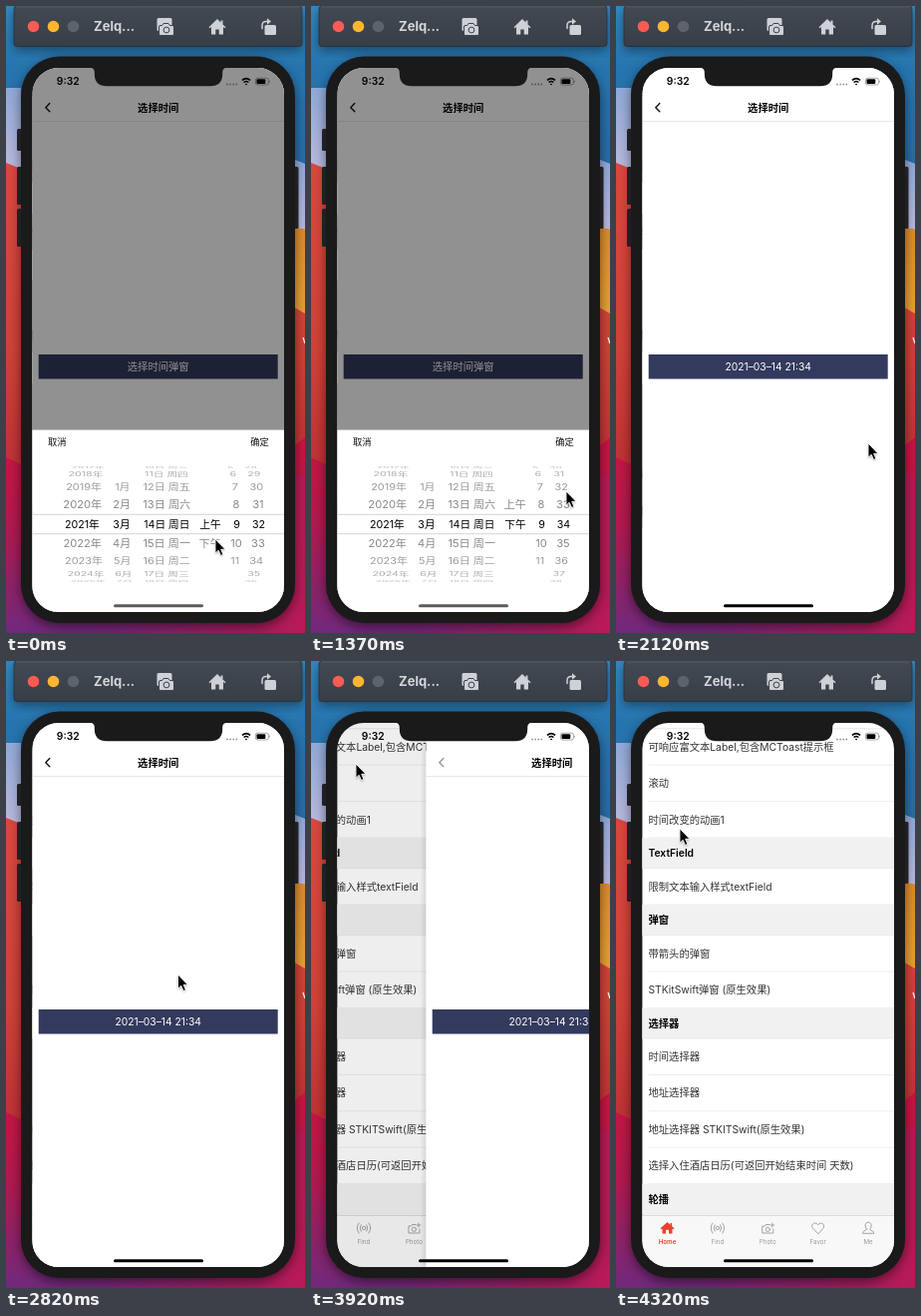
These frames come from a looping animation (300x628 px, 4340 ms). An HTML page:

```html
<!DOCTYPE html>
<html lang="zh-CN">
<head>
<meta charset="utf-8">
<title>选择时间</title>
<style>
html, body { margin: 0; width: 100%; height: 100%; overflow: hidden; background: #1d1d1f; }
svg { display: block; width: 100%; height: 100%; }
text { font-family: Inter, "Noto Sans CJK SC", "Noto Sans CJK", sans-serif; white-space: pre; }
.line { fill: none; stroke-linecap: round; stroke-linejoin: round; }
</style>
</head>
<body>
<svg id="stage" viewBox="0 0 300 628" xmlns="http://www.w3.org/2000/svg">
  <defs>
    <linearGradient id="wallSky" x1="0" y1="0" x2="0" y2="1">
      <stop offset="0" stop-color="#3489c2"/><stop offset=".1" stop-color="#2674ae"/>
      <stop offset=".26" stop-color="#2a6ca6"/>
    </linearGradient>
    <linearGradient id="wallPale" x1="0" y1="0" x2="0" y2="1">
      <stop offset="0" stop-color="#8fa9d8"/><stop offset="1" stop-color="#b9b9dc"/>
    </linearGradient>
    <linearGradient id="wallRed" x1="0" y1="0" x2="0" y2="1">
      <stop offset="0" stop-color="#d9483d"/><stop offset=".6" stop-color="#cf4237"/>
      <stop offset="1" stop-color="#bd3136"/>
    </linearGradient>
    <linearGradient id="wallLow" x1="0" y1="0" x2="0" y2="1">
      <stop offset="0" stop-color="#cb1440"/><stop offset=".45" stop-color="#b01a4e"/>
      <stop offset="1" stop-color="#70297c"/>
    </linearGradient>
    <linearGradient id="wallPink">
      <stop offset=".3" stop-color="#b81a56" stop-opacity="0"/><stop offset="1" stop-color="#b81a56"/>
    </linearGradient>
    <linearGradient id="wallGold" x1="0" y1="0" x2="0" y2="1">
      <stop offset="0" stop-color="#dc8a2c"/><stop offset="1" stop-color="#e7a234"/>
    </linearGradient>
    <linearGradient id="bar" x1="0" y1="0" x2="0" y2="1">
      <stop offset="0" stop-color="#434953"/><stop offset="1" stop-color="#383e48"/>
    </linearGradient>
    <linearGradient id="edge">
      <stop offset="0" stop-color="#000" stop-opacity="0"/><stop offset="1" stop-color="#000" stop-opacity=".1"/>
    </linearGradient>
    <filter id="blur" x="-20%" y="-20%" width="140%" height="140%"><feGaussianBlur stdDeviation="6"/></filter>
    <filter id="soft" x="-50%" y="-50%" width="200%" height="200%"><feGaussianBlur stdDeviation="1"/></filter>
    <clipPath id="screen"><rect x="26.400" y="62" width="252.600" height="545" rx="26.500"/></clipPath>
    <clipPath id="drum"><rect x="26" y="460.500" width="253" height="116.500"/></clipPath>
  </defs>

  <rect width="300" height="628" fill="url(#wallSky)"/>
  <path d="M0 82H15V165H0z" fill="url(#wallPale)"/>
  <path d="M285 152L300 158V226H285z" fill="url(#wallPale)"/>
  <path d="M0 157L15 163L286 221L300 224V470H0z" fill="url(#wallRed)"/>
  <path d="M286 221L300 224V308L286 300z" fill="url(#wallGold)"/>
  <path d="M0 452L15 459L290 440L300 432V628H0z" fill="url(#wallLow)"/>
  <path d="M0 470H300V628H0z" fill="url(#wallPink)"/>
  <path d="M298 332L300 338" stroke="#fff" stroke-width="1.200"/>
  <rect x="15" y="54" width="275" height="568" rx="40" filter="url(#blur)" opacity=".5"/>
  <rect x="8" y="4" width="289" height="40" rx="3" filter="url(#blur)" opacity=".45"/>

  <rect x="8" y="0" width="289" height="40.500" rx="3" fill="url(#bar)" stroke="#23272e" stroke-width=".6"/>
  <path d="M10 .8H295" stroke="#646a73" stroke-width=".7"/>
  <circle cx="27.500" cy="20.500" r="5.800" fill="#fc5b53"/>
  <circle cx="47.500" cy="20.500" r="5.800" fill="#fcb62f"/>
  <circle cx="67.500" cy="20.500" r="5.800" fill="#5d626c"/>
  <text x="88" y="25.300" font-size="13" font-weight="700" fill="#d5d7da">Zelq...</text>
  <g fill="#ced1d5" stroke="#3d434d">
    <rect x="151.500" y="12" width="15" height="13" rx="1.500" stroke="none"/>
    <path d="M154 19.500h2.700l1.300-2h5l1.300 2h2.700q1.500 0 1.500 1.500v7q0 1.500-1.500 1.500h-12q-1.500 0-1.500-1.500v-7q0-1.500 1.500-1.500z"/>
    <circle cx="161" cy="24" r="2.900"/>
    <path d="M212 13L203.500 21.300L204.500 22.300L206 21V28.500H210.300V23.500H213.700V28.500H218V21L219.500 22.300L220.500 21.300L217.500 18.400V14.500H215.500V16.400z" stroke="none"/>
    <rect x="259.500" y="19" width="11.500" height="10" rx="1.500" stroke="none"/>
    <path class="line" d="M257 22.500V19.500Q257 15.500 261 15.500H263" stroke="#ced1d5" stroke-width="1.500"/>
    <path d="M262 12.300L266 15.500L262 18.700z" stroke="none"/>
  </g>

  <g fill="#202024">
    <rect x="11" y="123" width="6" height="22" rx="1.500"/>
    <rect x="11" y="161" width="6" height="38" rx="1.500"/>
    <rect x="11" y="203" width="6" height="38" rx="1.500"/>
    <rect x="287" y="161" width="6.500" height="62" rx="1.500"/>
  </g>
  <rect x="15" y="50.500" width="275" height="567.500" rx="38.500" fill="#1a1a1b"/>

  <g clip-path="url(#screen)">
    <rect x="26" y="62" width="253" height="545" fill="#fff"/>
    <g id="list"></g>
    <rect id="listDim" x="26" y="62" width="253" height="545"/>
    <g id="page">
      <rect x="20.500" y="62" width="6" height="545" fill="url(#edge)"/>
      <rect x="26.400" y="62" width="253" height="545" fill="#fff"/>
      <path d="M26.400 115.500H279" stroke="#dedede" stroke-width=".7"/>
      <path id="back" class="line" d="M43.800 97.600L39.800 101.700L43.800 105.800" stroke="#111" stroke-width="1.400"/>
      <text x="152.700" y="105.700" font-size="10.300" font-weight="600" text-anchor="middle">选择时间</text>
      <rect x="32.700" y="349" width="240" height="24.500" fill="#333a5e"/>
      <text id="label" x="152.700" y="365" font-size="10.300" fill="#fff" text-anchor="middle"></text>
    </g>
    <rect id="dim" x="26" y="62" width="253" height="545"/>
    <g id="sheet">
      <rect x="26" y="424.600" width="253" height="183" fill="#fff"/>
      <text x="42" y="440.300" font-size="9.300" fill="#111">取消</text>
      <text x="245.300" y="440.300" font-size="9.300" fill="#111">确定</text>
      <path d="M26 509.300H279M26 528.700H279" stroke="#cbcbcb" stroke-width=".8"/>
      <g id="wheels" clip-path="url(#drum)"></g>
    </g>
    <text x="50.800" y="79.400" font-size="10.300" font-weight="600">9:32</text>
    <g id="dots" opacity=".42"></g>
    <g class="line" stroke="#000" stroke-width="1.500">
      <path d="M236.900 74.400Q241 70.900 245.100 74.400M238.600 76.500Q241 74.600 243.400 76.500" stroke-linecap="butt"/>
      <circle cx="241" cy="78.400" r=".5" stroke-width=".8" fill="#000"/>
    </g>
    <g opacity=".5">
      <rect x="250.400" y="72.200" width="13" height="6.800" rx="2" fill="none" stroke="#000" stroke-width=".7"/>
      <path d="M264.400 74.300Q266 75.600 264.400 76.900z"/>
    </g>
    <rect x="251.500" y="73.300" width="8.800" height="4.600" rx="1"/>
    <rect id="homeBar" x="108" y="599.200" width="90" height="3" rx="1.500"/>
  </g>
  <path d="M84 60V61.800Q88.800 62 88.800 66.500V68Q88.800 80.300 101 80.300H205Q217.200 80.300 217.200 68V66.500Q217.200 62 222 61.800V60z" fill="#1a1a1b"/>
  <g id="cursor">
    <path d="M0 1.500V15.500L3.200 12.600L5.500 17.600L7.900 16.500L5.700 11.600H10z" filter="url(#soft)" opacity=".35"/>
    <path d="M0 0V14.200L3.200 11.300L5.500 16.500L7.900 15.400L5.700 10.300H10z" stroke="#fff" stroke-width=".9"/>
  </g>
</svg>
<script>
const LOOP = 4340, WIDTH = 252, SHEET = 183;
const $ = id => document.getElementById(id);
const clamp = v => Math.min(1, Math.max(0, v));
const span = (t, a, b) => clamp((t - a) / (b - a));
const smooth = u => u * u * (3 - 2 * u);
const move = (id, x, y) => $(id).setAttribute('transform', `translate(${x.toFixed(2)} ${y.toFixed(2)})`);
const fade = (id, v) => $(id).setAttribute('opacity', v.toFixed(3));

// Underlying list: a leading # marks a section header
const ROWS = ['可响应富文本Label,包含MCToast提示框', '滚动', '时间改变的动画1', '#TextField',
  '限制文本输入样式textField', '#弹窗', '带箭头的弹窗', 'STKitSwift弹窗 (原生效果)', '#选择器',
  '时间选择器', '地址选择器', '地址选择器 STKITSwift(原生效果)', '选择入住酒店日历(可返回开始结束时间 天数)', '#轮播'];
const TABS = [
  ['Home', '<path d="M0-6L-7 .3L-6 1.200L-5 .5V5.500H-1.500V1.800H1.500V5.500H5V.5L6 1.200L7 .3L4.500-2V-5H3V-3.300z" fill="#e8412c" stroke="none"/>'],
  ['Find', '<circle r="1.700"/><path d="M-2.800-3.200Q-5 0-2.800 3.200M2.800-3.200Q5 0 2.800 3.200M-5-5Q-8.500 0-5 5M5-5Q8.500 0 5 5"/>'],
  ['Photo', '<path d="M1.500-3.500H-2L-3-2H-5.500V5H5.500V1"/><circle cy="1.300" r="2.100"/><path d="M4.500-5V-1M2.500-3H6.500"/>'],
  ['Favor', '<path d="M0 5.500L-5.200.2C-8-3-3.500-7.300 0-3.300C3.500-7.300 8-3 5.200.2z"/>'],
  ['Me', '<path d="M-1.500 1C-4-1-3.500-5.800 0-5.800S4-1 1.500 1Q1.600 2 4.500 3Q5.500 3.500 5.500 5.300H-5.500Q-5.500 3.500-4.500 3Q-1.600 2-1.500 1z"/>'],
];

function buildList() {
  let y = 67.8, out = '<path d="M26 67.800H279" stroke="#dcdcdc" stroke-width=".7"/>';
  for (const row of ROWS) {
    const head = row[0] === '#', h = head ? 30.6 : 36.4;
    if (head) out += `<rect x="26" y="${y}" width="253" height="${h}" fill="#f1f1f2"/>`;
    out += `<text x="32.500" y="${y + h / 2 + 3.8}" font-size="10.300" fill="${head ? '#000' : '#333'}" font-weight="${head ? 600 : 400}">${head ? row.slice(1) : row}</text>`;
    y += h;
    out += `<path d="M${head ? 26 : 33} ${y}H279" stroke="#e2e2e2" stroke-width=".6"/>`;
  }
  out += '<rect x="26" y="555.500" width="253" height="52" fill="#f8f8f8"/><path d="M26 555.500H279" stroke="#cfcfcf" stroke-width=".7"/>';
  TABS.forEach(([name, icon], i) => {
    const x = 51.5 + 50.4 * i;
    out += `<g class="line" stroke="#9a9a9a" stroke-width=".9" transform="translate(${x} 568)">${icon}</g>`
      + `<text x="${x}" y="584.300" font-size="6.200" font-weight="${i ? 400 : 600}" text-anchor="middle" fill="${i ? '#9a9a9a' : '#e8412c'}">${name}</text>`;
  });
  $('list').innerHTML = out;
}

// Picker columns: centre x, selected index, item by index (empty outside the range)
const WEEK = '日一二三四五六';
const COLS = [
  [76.3, 2021, n => n + '年'],
  [116, 3, n => n > 0 ? n + '月' : ''],
  [161.3, 14, n => `${n}日 周${WEEK[n % 7]}`],
  [205, 0, n => ['上午', '下午'][n] || ''],
  [231.5, 9, n => n < 12 ? n : ''],
  [253.5, 32, n => n],
];
const STEP = 19.5 * Math.PI / 180, RADIUS = 58.5;

function drum([x, , item], pos) {
  let out = '';
  for (let n = Math.round(pos) - 4; n <= Math.round(pos) + 4; n++) {
    const d = n - pos, a = d * STEP, c = Math.cos(a), on = Math.abs(d) < .5;
    if (c < .1) continue;
    const k = 1 - .1 * (1 - c), size = on ? 10.7 : 11.2;
    const grey = on ? 0 : Math.round(118 + 18 * Math.min(4, Math.abs(d)));
    out += `<text transform="translate(${153 + (x - 153) * k} ${519 + RADIUS * Math.sin(a)}) scale(${k} ${c})" y="${size * .37}" font-size="${size}" text-anchor="middle" fill="rgb(${grey},${grey},${grey})">${item(n)}</text>`;
  }
  return out;
}

// Pointer tip: time, x, y
const PATH = [[0, 210, 534], [70, 210, 534], [370, 211, 513], [520, 226, 510], [770, 252, 511],
  [920, 255, 525], [1270, 256, 486], [1420, 256, 486], [1720, 253, 438], [2570, 253, 438],
  [3070, 92, 190], [3370, 67, 127], [3620, 45, 103], [3920, 45, 103], [4070, 50, 119], [4320, 64, 168]];

function pointer(t) {
  let i = 0;
  while (i < PATH.length - 2 && t >= PATH[i + 1][0]) i++;
  const [t0, x0, y0] = PATH[i], [t1, x1, y1] = PATH[i + 1], u = smooth(span(t, t0, t1));
  return [x0 + (x1 - x0) * u, y0 + (y1 - y0) * u];
}

function tick(t) {
  if (t < 20) return 0;
  const q = 20 + 50 * Math.floor((t - 20) / 50);
  return q >= 3920 && q < 4070 ? 3920 : q;
}

function draw(time) {
  const t = tick(time);
  const half = smooth(span(t, 70, 420)), minute = 32 + 2 * smooth(span(t, 920, 1320));
  COLS.forEach((col, i) => {
    if (i === 3 || i === 5 || !wheels[i].firstChild)
      wheels[i].innerHTML = drum(col, i === 3 ? half : i === 5 ? minute : col[1]);
  });

  const away = smooth(span(t, 1820, 2070)), shade = 1 - away;
  move('sheet', 0, SHEET * away);
  fade('dim', .43 * shade);
  const bar = Math.round(92 * shade);
  $('homeBar').setAttribute('fill', `rgb(${bar},${bar},${bar})`);
  $('label').textContent = t < 1820 ? '选择时间弹窗' : '2021–03–14 21:34';

  const pop = t < 3870 ? 0 : Math.min(1, 1.03 * (1 - Math.exp(-.0084 * (t - 3870))));
  move('page', WIDTH * pop, 0);
  $('page').style.display = pop < 1 ? '' : 'none';
  fade('back', clamp(1 - 1.6 * pop));
  move('list', -.3 * WIDTH * (1 - pop), 0);
  fade('listDim', .1 * (1 - pop));
  move('cursor', ...pointer(t));
}

buildList();
$('wheels').innerHTML = '<g></g>'.repeat(COLS.length);
const wheels = [...$('wheels').children];
$('dots').innerHTML = [0, 1, 2, 3].map(i => `<circle cx="${222 + 3.1 * i}" cy="78.500" r=".9"/>`).join('');

const start = performance.now();
function frame() {
  draw((performance.now() - start) % LOOP);
  requestAnimationFrame(frame);
}
frame();
</script>
</body>
</html>
```
